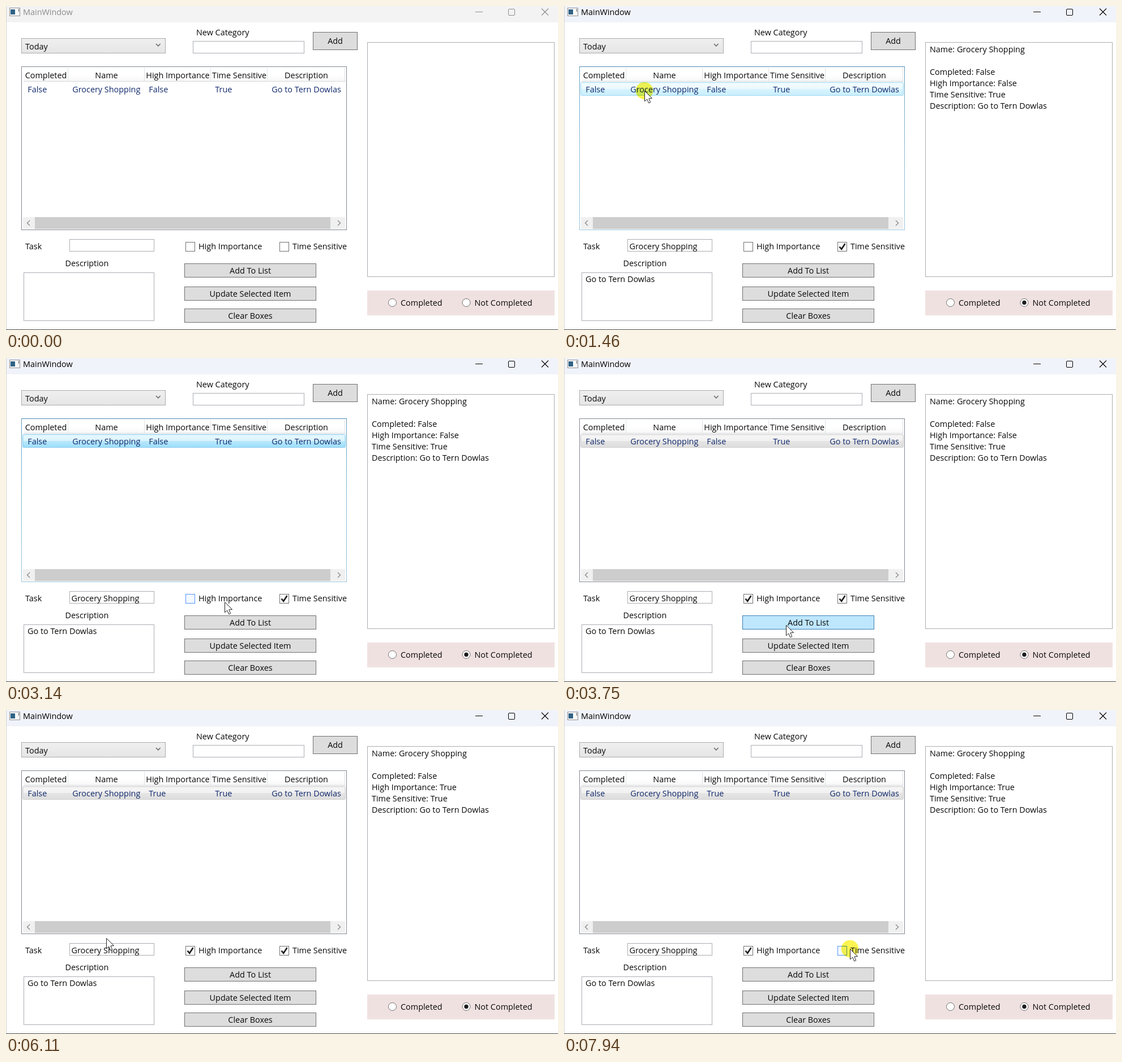
Recreate the animation shown at these times as an HTML page with a canvas. Size 975 by 574 pixels, loop 8000 ms.

```html
<!DOCTYPE html>
<html lang="en">
<head>
<meta charset="utf-8">
<title>Task list</title>
<style>
  html, body { margin: 0; width: 100%; height: 100%; overflow: hidden; background: #fff; }
  canvas { display: block; }
</style>
</head>
<body>
<canvas id="stage" width="975" height="574"></canvas>
<script>
const ctx = document.getElementById('stage').getContext('2d');
const LOOP = 8000, TICK = 77;
const FONT = '14.4px "Open Sans", sans-serif';
const INK = '#080808', NAVY = '#10296b', EDGE = '#707070', SOFT_EDGE = '#abadb3';
const TASK = 'Grocery Shopping', NOTE = 'Go to Tern Dowlas';
const ARROW = new Path2D('M0 0V18.3L4.2 14.6L7.2 21.4L10.2 20.1L7.3 13.4L13 13Z');

const glide = (start, end, x, y) => ({ start, end, x, y });
const click = (start, end) => t => t >= start && t < end;

// The pointer rests between glides.
const ENTRY = { x: 296, y: 558 };
const GLIDES = [
  glide(440, 1220, 142, 150),
  glide(1970, 2740, 466, 427),
  glide(2810, 2890, 400, 437),
  glide(3070, 3140, 386, 432),
  glide(3600, 3890, 396, 496),
  glide(4060, 4120, 402, 504),
  glide(5110, 5570, 360, 511),
  glide(5800, 6110, 177, 404),
  glide(6180, 6340, 110, 382),
  glide(6410, 6570, 80, 490),
  glide(6720, 6950, 251, 449),
  glide(7030, 7490, 502, 426),
  glide(7570, 7720, 505, 423)
];
const selectRow = click(1460, 1600), tickHigh = click(3300, 3450);
const update = click(4440, 4500), clearTime = click(7860, LOOP);
const isPressed = t => [selectRow, tickHigh, update, clearTime].some(hit => hit(t));

function pointerAt(t) {
  if (t < GLIDES[0].start) return { x: -99, y: -99 };
  let { x, y } = ENTRY;
  for (const g of GLIDES) {
    if (t < g.start) break;
    const count = Math.round((g.end - g.start) / TICK) + 1;
    const step = Math.floor((t - g.start) / (g.end - g.start) * (count - 1) + 0.01);
    const u = Math.min(1, (step + 1) / count);
    const eased = u * u * (3 - 2 * u);
    x += (g.x - x) * eased;
    y += (g.y - y) * eased;
  }
  return { x: Math.round(x), y: Math.round(y) };
}

function text(str, x, y, color = INK, align = 'left') {
  ctx.fillStyle = color;
  ctx.textAlign = align;
  ctx.fillText(str, x, y + 5);
}

function fill(x, y, w, h, color) {
  ctx.fillStyle = color;
  ctx.fillRect(x, y, w, h);
}

function box(x, y, w, h, color, edge) {
  fill(x, y, w, h, color);
  ctx.strokeStyle = edge;
  ctx.lineWidth = 1;
  ctx.strokeRect(x + 0.5, y + 0.5, w - 1, h - 1);
}

function line(color, width, ...pts) {
  ctx.strokeStyle = color;
  ctx.lineWidth = width;
  ctx.beginPath();
  for (let i = 0; i < pts.length; i += 2) ctx.lineTo(pts[i], pts[i + 1]);
  ctx.stroke();
}

// Chevron with its tip at (x, y); (dx, dy) leads back from the tip.
function chevron(color, x, y, dx, dy) {
  const spread = Math.abs(dx) === Math.abs(dy) ? 1 : -1;
  line(color, 1.4, x + dx, y + dy, x, y, x - spread * dx * (dy < 0 ? 1 : -1), y + spread * dy * (dy < 0 ? 1 : -1));
}

function disc(x, y, r, color, edge) {
  ctx.beginPath();
  ctx.arc(x, y, r, 0, Math.PI * 2);
  ctx.fillStyle = color;
  ctx.fill();
  if (!edge) return;
  ctx.strokeStyle = edge;
  ctx.lineWidth = 1;
  ctx.stroke();
}

function shade(y0, y1, ...colors) {
  const g = ctx.createLinearGradient(0, y0, 0, y1);
  colors.forEach((c, i) => g.addColorStop(i / (colors.length - 1), c));
  return g;
}

function drawTitleBar(active) {
  const ink = active ? '#000' : '#8c8c8c';
  fill(0, 0, 975, 29, active ? '#f0f3f9' : '#f3f3f3');
  box(6, 3, 19, 15, '#fafafa', '#8f8f8f');
  fill(8, 6, 8, 9, '#2f6286');
  fill(22, 5, 1, 5, '#555');
  text('MainWindow', 30, 10.5, ink);
  line(ink, 1, 829, 10.5, 842, 10.5);
  ctx.beginPath();
  ctx.roundRect(887.5, 5.5, 11, 11, 1.5);
  ctx.stroke();
  line(ink, 1.1, 946, 4.5, 958, 16.5);
  line(ink, 1.1, 958, 4.5, 946, 16.5);
}

function button(label, x, y, w, h, over) {
  const hot = over(x, y, w, h);
  box(x, y, w, h, hot ? '#bee6fd' : '#ddd', hot ? '#3c7fb1' : EDGE);
  text(label, x + w / 2, y + h / 2, INK, 'center');
}

function textBox(x, y, w, h, over) {
  box(x, y, w, h, '#fff', over(x, y, w, h) ? '#7eb4ea' : SOFT_EDGE);
}

function checkBox(label, x, w, checked, pressed, over) {
  const hot = over(x, 417, w, 19);
  const face = hot ? (pressed ? '#d9ecff' : '#f3f9ff') : '#fff';
  box(x, 418, 17, 17, face, hot ? '#5593ff' : EDGE);
  if (checked) line('#1c1c1c', 2.6, x + 3.5, 426.5, x + 7.2, 430.8, x + 13.5, 421);
  text(label, x + 23, 426);
}

function radio(label, x, on) {
  disc(x, 525.5, 7, '#fff', EDGE);
  if (on) disc(x, 525.5, 3.7, '#1c1c1c');
  text(label, x + 14.5, 526);
}

function drawRow(s, hot) {
  if (!s.selected && !hot) return;
  let colors = ['#eaf9ff', '#c7eefd'], edge = '#a0d8f2';
  if (s.selected && !hot) {
    colors = s.listFocus ? ['#d9f4ff', '#9bddfb'] : ['#eeeded', '#dddddd'];
    edge = s.listFocus ? '#8ccdec' : '#cfcfcf';
  }
  ctx.beginPath();
  ctx.roundRect(29.5, 135.5, 570, 23, 2);
  ctx.fillStyle = shade(135, 159, ...colors);
  ctx.fill();
  ctx.strokeStyle = edge;
  ctx.lineWidth = 1;
  ctx.stroke();
  fill(31, 137, 567, 10, 'rgba(255,255,255,.46)');
}

function drawList(s, over) {
  const lit = s.listFocus || over(27, 107, 575, 290);
  box(27, 107, 575, 290, '#fff', lit ? shade(107, 397, '#5f9bc2', '#8abbd8', '#97c5df') : '#828790');
  if (lit) fill(27, 107, 575, 1, '#4d8ab5');

  fill(31, 110, 568, 24, shade(110, 134, '#fff', '#fff', '#f5f6f7'));
  fill(31, 133, 569, 1, '#d8d8d8');
  drawRow(s, over(30, 136, 570, 24));

  const columns = [
    ['Completed', 'False', 79],
    ['Name', TASK, 135],
    ['High Importance', s.savedHigh, 117],
    ['Time Sensitive', 'True', 100],
    ['Description', NOTE, 137]
  ];
  let left = 31;
  for (const [head, cell, width] of columns) {
    text(head, left + width / 2, 122.5, INK, 'center');
    text(cell, left + 7.3, 147.5, NAVY);
    left += width;
    fill(left - 1, 110, 1, 24, '#dfe1e3');
  }

  fill(30, 374, 569, 21, '#f0f0f0');
  fill(51, 374, 522, 21, '#cdcdcd');
  for (const side of [-1, 1]) {
    const tip = 314 + side * 276.5, back = tip - side * 4.5;
    line('#8a8a8a', 1.4, back, 380, tip, 384.5, back, 389);
  }
}

function drawDetails(s) {
  box(638, 64, 331, 416, '#fff', SOFT_EDGE);
  if (s.selected) {
    ['Name: ' + TASK, '', 'Completed: False', 'High Importance: ' + s.savedHigh,
      'Time Sensitive: True', 'Description: ' + NOTE]
      .forEach((row, i) => text(row, 646, 77 + 20 * i));
  }
  fill(638, 504, 331, 44, '#f0e1e1');
  radio('Completed', 682.5, false);
  radio('Not Completed', 813, s.selected);
}

function drawForm(s, over) {
  text('Task', 34, 425.5);
  textBox(112, 413, 150, 22, over);
  text('Description', 104.5, 456);
  textBox(31, 472, 231, 86, over);
  if (s.selected) {
    text(TASK, 115.5, 425.5);
    text(NOTE, 38, 483.5);
  }
  checkBox('High Importance', 317, 136, s.high, s.pressed, over);
  checkBox('Time Sensitive', 483, 119, s.time, s.pressed && s.time, over);
  button('Add To List', 315, 456, 233, 25, over);
  button('Update Selected Item', 315, 497, 233, 25, over);
  button('Clear Boxes', 315, 536, 233, 25, over);
}

function drawTop(over) {
  box(27, 57, 255, 27, shade(57, 84, '#f0f0f0', '#e5e5e5'), '#acacac');
  text('Today', 34, 71.5);
  line('#606060', 1.4, 265, 67, 268.8, 71, 272.6, 67);
  text('New Category', 336, 47);
  textBox(330, 62, 197, 22, over);
  button('Add', 542, 46, 79, 32, over);
}

function drawPointer({ x, y }, pressed) {
  if (pressed) {
    ctx.globalCompositeOperation = 'multiply';
    disc(x, y, 15.3, '#fbf451');
    ctx.globalCompositeOperation = 'source-over';
  }
  ctx.save();
  ctx.translate(x + 0.5, y + 0.5);
  ctx.fillStyle = '#fff';
  ctx.fill(ARROW);
  ctx.strokeStyle = '#222';
  ctx.lineWidth = 1;
  ctx.stroke(ARROW);
  ctx.restore();
}

function draw(t) {
  const pointer = pointerAt(t);
  const over = (x, y, w, h) =>
    pointer.x >= x && pointer.x < x + w && pointer.y >= y && pointer.y < y + h;
  const state = {
    selected: t >= 1460,
    listFocus: t >= 1460 && t < 3300,
    high: t >= 3450,
    time: t >= 1460 && t < 7940,
    savedHigh: t >= 4500 ? 'True' : 'False',
    pressed: isPressed(t)
  };
  ctx.font = FONT;
  fill(0, 0, 975, 574, '#fff');
  drawTitleBar(state.selected);
  drawTop(over);
  drawList(state, over);
  drawForm(state, over);
  drawDetails(state);
  fill(0, 0, 1, 574, '#d4d4d4');
  fill(0, 573, 975, 1, '#4a4a4a');
  drawPointer(pointer, state.pressed);
}

const began = performance.now();
function tick() {
  draw((performance.now() - began) % LOOP);
  requestAnimationFrame(tick);
}
tick();
</script>
</body>
</html>
```
